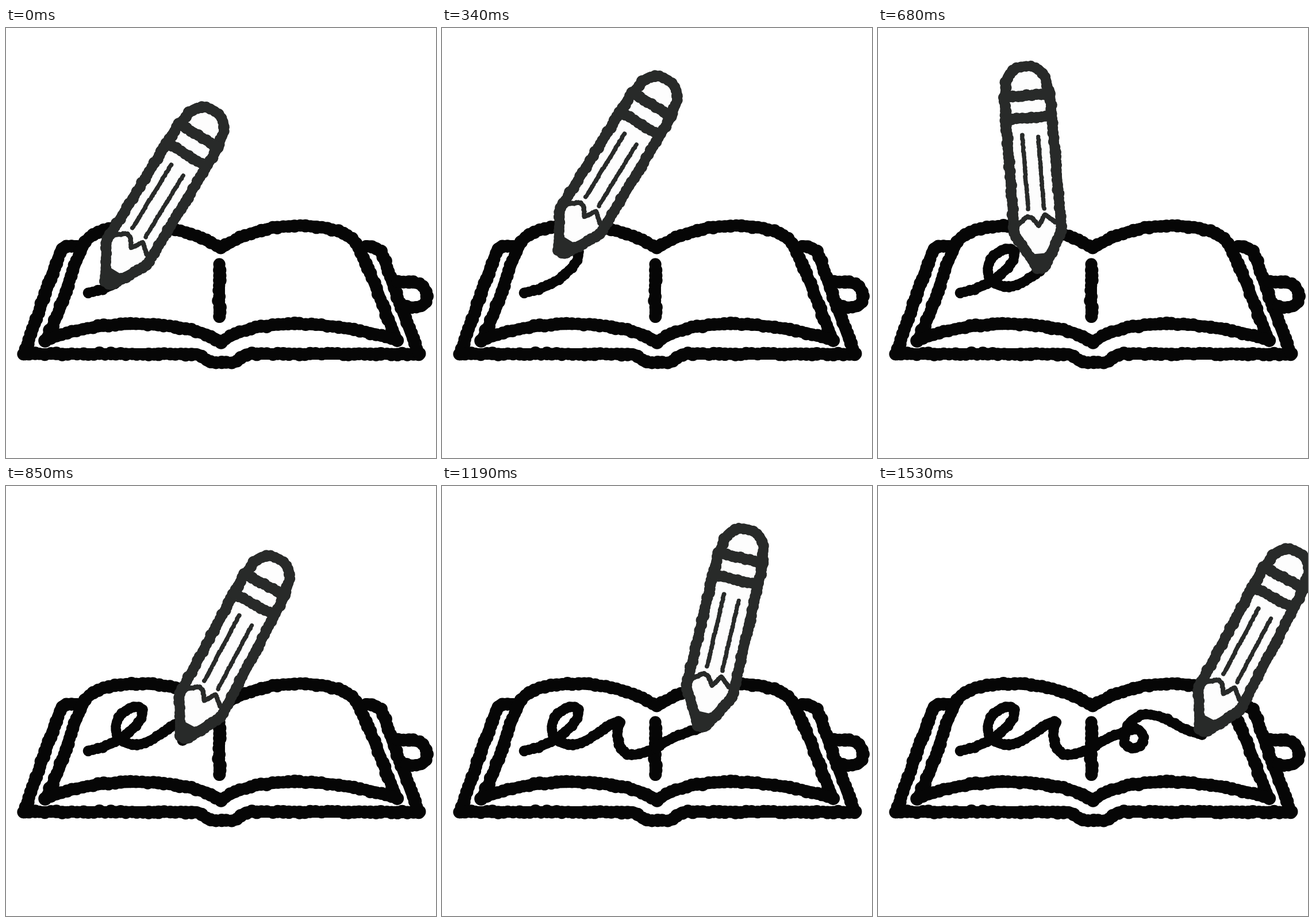
Recreate the animation shown at these times as an HTML page with a canvas. Size 748 by 748 pixels, loop 1700 ms.

```html
<!DOCTYPE html>
<html lang="en">
<head>
<meta charset="utf-8">
<title>Writing in a book</title>
<style>
  html, body { margin: 0; width: 100%; height: 100%; overflow: hidden; background: #fff; }
  canvas { display: block; width: 748px; height: 748px; }
</style>
</head>
<body>
<canvas id="stage" width="748" height="748"></canvas>
<script>
const ctx = document.getElementById('stage').getContext('2d');
const STEP = 170;
const INK = '#060606';
const GRAPHITE = '#282a29';

let seed = 7;
function random() {
  seed = (seed * 16807) % 2147483647;
  return seed / 2147483647;
}
const jitter = amount => (random() * 2 - 1) * amount;

// A crayon line: a solid core with uneven round dabs along it.
function crayon(d, width, rough = 1) {
  const line = document.createElementNS('http://www.w3.org/2000/svg', 'path');
  line.setAttribute('d', d);
  const length = line.getTotalLength();
  const count = Math.max(1, Math.round(length / (width * 0.42)));
  const dabs = new Path2D();
  for (let i = 0; i <= count; i++) {
    const p = line.getPointAtLength(length * i / count);
    const x = p.x + jitter(rough), y = p.y + jitter(rough);
    const r = width / 2 + jitter(rough / 2);
    dabs.moveTo(x + r, y);
    dabs.arc(x, y, r, 0, Math.PI * 2);
  }
  return { core: new Path2D(d), dabs, width: width - 2 * rough };
}

function paint(line, color) {
  ctx.strokeStyle = ctx.fillStyle = color;
  ctx.lineWidth = line.width;
  ctx.stroke(line.core);
  ctx.fill(line.dabs);
}

const book = [
  // cover
  'M124 379 L108 379 Q98 380 94 391 L76 440 L55 500 L31 567',
  'M31 567 H328 C343 567 345 581 360 582 H393 C408 581 408 567 424 567 H718',
  'M718 567 L685 480 L657 400 Q650 379 626 379',
  // pages
  'M69 543 Q94 494 106 452 Q118 412 138 371',
  'M138 371 C156 350 190 344 225 344 C285 344 325 354 374 383',
  'M374 383 C420 353 465 344 510 344 C555 344 590 352 609 374',
  'M609 374 Q626 407 642 447 Q660 495 680 543',
  'M69 543 C120 523 170 515 225 515 C290 516 338 524 374 546',
  'M374 546 C410 521 455 515 510 515 C570 516 625 526 680 543',
  'M371 412 V503',
  // bookmark loop
  'M682 441 L710 443 C728 445 733 459 731 471 C730 485 717 487 696 485'
].map(d => crayon(d, 22.5, 1.3));

// Handwriting, one piece per step.
const writing = [
  'M144 460 C158 458 173 453 190 445',
  'M190 445 C198 441 207 435 214 428',
  'M214 428 C230 414 240 402 237 390 C234 381 220 382 208 391',
  'M208 391 C190 404 184 426 200 441 C208 449 218 451 228 450',
  'M228 450 C248 447 264 435 281 423',
  'M281 423 C296 411 306 408 311 411 C304 421 304 431 307 442',
  'M307 442 C311 462 320 468 330 468 C346 467 358 461 372 456',
  'M372 456 C390 442 412 432 447 422',
  'M447 422 C462 426 464 438 459 447 C452 460 434 459 429 445 C427 428 434 411 447 404 C462 394 478 396 503 406',
  'M503 406 C520 417 540 428 564 432'
].map(d => crayon(d, 18.5));

// Pencil, upright, with its point at the origin.
const outline = 'M-6 -2 L-41 -64 L-40 -300 L-36 -318 C-36 -366 36 -366 36 -318 L40 -300 L41 -64 L6 -2 Z';
const body = new Path2D(outline);
const lead = new Path2D('M-22 -27 H22 L7 4 H-7 Z');
const pencil = [
  crayon(outline, 19.5, 1.2),
  crayon('M-40 -303 H40', 20, 1.2),
  crayon('M-38 -264 H38', 19.5, 1.2),
  crayon('M-14 -235 V-106', 7.5, 0.6),
  crayon('M13.5 -230 V-105', 7.5, 0.6),
  crayon('M-34 -80 L-16 -93 L-7 -89 L2 -75 L14 -94 L31 -80', 8.5, 0.6)
];

// Point x, point y, lean in degrees.
const poses = [
  [176.6, 445.5, 31.5],
  [211.5, 420, 13.2],
  [206.6, 391.5, 31.5],
  [225.5, 448, 13.2],
  [283.6, 419.3, -4.6],
  [307.7, 439, 28],
  [371.8, 450.4, 3.7],
  [450.5, 420, 13.2],
  [503.8, 404.4, -2.2],
  [563.7, 427, 28]
];

function drawPencil([x, y, lean]) {
  ctx.save();
  ctx.translate(x, y);
  ctx.rotate(lean * Math.PI / 180);
  ctx.fillStyle = '#fdfdfd';
  ctx.fill(body);
  pencil.forEach(line => paint(line, GRAPHITE));
  ctx.fill(lead);
  ctx.restore();
}

function draw(step) {
  ctx.fillStyle = '#fff';
  ctx.fillRect(0, 0, 748, 748);
  ctx.lineCap = ctx.lineJoin = 'round';
  book.forEach(line => paint(line, INK));
  writing.slice(0, step + 1).forEach(line => paint(line, INK));
  drawPencil(poses[step]);
}

const start = performance.now();
let shown = -1;
function tick() {
  const step = Math.floor((performance.now() - start) / STEP) % poses.length;
  if (step !== shown) draw(shown = step);
  requestAnimationFrame(tick);
}
tick();
</script>
</body>
</html>
```
